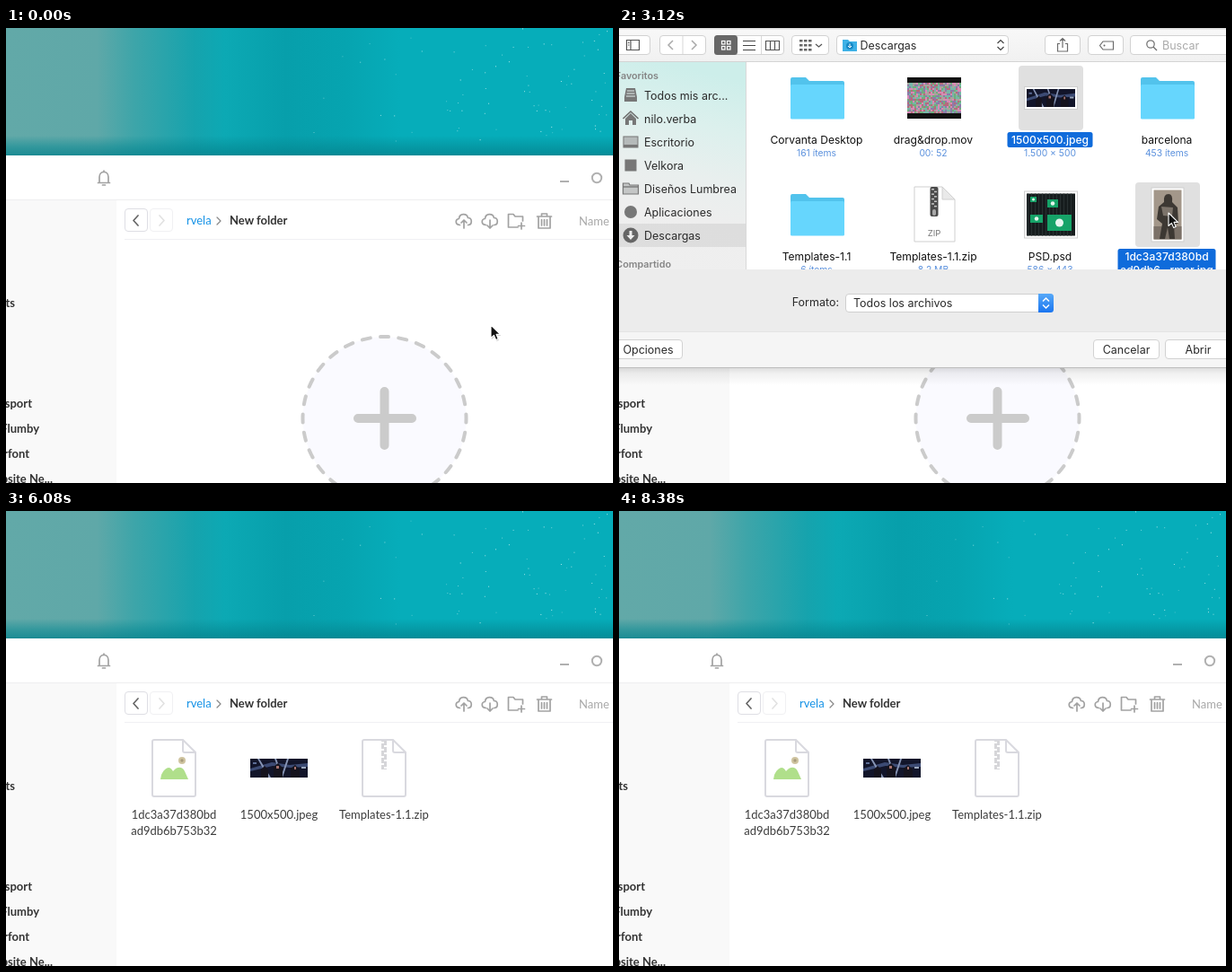
Animation, 676 px wide and 507 px high, one loop 8.4 s. Source, as an HTML page:

```html
<!DOCTYPE html>
<html lang="es">
<head>
<meta charset="utf-8">
<title>File upload</title>
<style>
html, body { margin: 0; width: 100%; height: 100%; overflow: hidden; background: #fff; }
svg { display: block; width: 676px; height: 507px; }
.app text { font: 13px Lato, sans-serif; fill: #3c3c3c; }
.app .b { font-weight: 700; fill: #333; }
.panel text { font: 12.5px Inter, sans-serif; fill: #2b2b2b; }
.panel .name { font-size: 12.1px; fill: #111; }
.panel .info { font-size: 10.3px; fill: #5b91dd; }
.panel .head { font-size: 10.8px; font-weight: 600; fill: #858585; }
.panel .picked { font-size: 12.1px; font-weight: 500; fill: #fff; }
.mid { text-anchor: middle; }
.end { text-anchor: end; }
.line { fill: none; stroke: #a2a2a2; stroke-width: 1.7; stroke-linecap: round; stroke-linejoin: round; }
.thin { fill: none; stroke: #6c6c6c; stroke-width: 1.2; }
</style>
</head>
<body>
<svg id="stage" viewBox="0 0 676 507" xmlns="http://www.w3.org/2000/svg"></svg>
<script>
const LOOP = 8400;
const stage = document.getElementById('stage');

let seed = 7;
const rnd = () => (seed = seed * 16807 % 2147483647) / 2147483647;
const times = (n, fn) => Array.from({ length: n }, (_, i) => fn(i)).join('');

const rect = (x, y, w, h, fill, extra = '') =>
  `<rect x="${x}" y="${y}" width="${w}" height="${h}" fill="${fill}" ${extra}/>`;
const path = (d, cls = 'line', extra = '') => `<path d="${d}" class="${cls}" ${extra}/>`;
const shape = (d, fill, extra = '') => `<path d="${d}" fill="${fill}" ${extra}/>`;
const disc = (x, y, r, fill, extra = '') => `<circle cx="${x}" cy="${y}" r="${r}" fill="${fill}" ${extra}/>`;
const text = (x, y, s, cls = '', extra = '') => `<text x="${x}" y="${y}" class="${cls}" ${extra}>${s}</text>`;
const at = (x, y, s) => `<g transform="translate(${x} ${y})">${s}</g>`;
const button = (x, y, w, h, border = '#d2d2d2', r = 3.5) =>
  rect(x + .5, y + .5, w - 1, h - 1, '#fff', `rx="${r}" stroke="${border}"`);
const gradient = (id, dir, stops) => `<linearGradient id="${id}" ${dir}>` +
  stops.map(([o, c, a = 1]) => `<stop offset="${o}" stop-color="${c}" stop-opacity="${a}"/>`).join('') +
  '</linearGradient>';

const down = 'x1="0" y1="0" x2="0" y2="1"';
const defs = `<defs>
  ${gradient('sea', '', [[0, '#62a9a8'], [.15, '#5fa8a8'], [.21, '#3ea5a9'], [.31, '#16a3ad'],
    [.36, '#0ca9b4'], [.46, '#079fab'], [.56, '#06a4b0'], [.65, '#06adba'], [1, '#06adba']])}
  ${gradient('surf', down, [[0, '#058791', 0], [.55, '#058791', .5], [1, '#04808b', .75]])}
  ${gradient('bar', down, [[0, '#f8f8f8'], [1, '#f1f1f1']])}
  ${gradient('tint', 'x1="0.35" y1="0" x2="0.2" y2="1"',
    [[0, '#cdeeea'], [.25, '#dcf0ed'], [.5, '#e9efee'], [.7, '#eeeeee'], [1, '#efefef']])}
  ${gradient('shade', down, [[0, '#000', .13], [.3, '#000', .06], [1, '#000', 0]])}
  ${gradient('blue', down, [[0, '#57a9f8'], [1, '#1a75f0']])}
  <clipPath id="list"><rect x="0" y="38" width="676" height="231"/></clipPath>
</defs>`;

// ---- application window ----
const wallpaper = rect(0, 0, 676, 142, 'url(#sea)') + rect(0, 120, 676, 22, 'url(#surf)') +
  times(75, () => {
    const x = 340 + 336 * Math.sqrt(rnd());
    return rect(x.toFixed(1), (rnd() * 126).toFixed(1), 1, 1, '#bff0f0', `opacity="${(.35 + rnd() * .6).toFixed(2)}"`);
  });

const cloud = 'M-4.5 4.5C-10 4.500-10-2-5.500-2.500C-5-8.500 3-9 4.500-3.500C9.500-3.500 9.500 4.500 4.500 4.500';
const cloudUp = path(cloud) + path('M0 8V-1M-3 2L0-1L3 2');
const cloudDown = path(cloud) + path('M0-1V8M-3 5L0 8L3 5');
const folderPlus = path('M2 7H-8.500V-7.500H-3L-1-5H7.500V0M6 2V9M2.500 5.500H9.500');
const trash = path('M-6.500-4.500V8H6.500V-4.500M-8-5H8M-3-5V-8H3V-5M-3-1.500V5M0-1.500V5M3-1.500V5');

const photoStrip = (x, y, w, h) => `<svg x="${x}" y="${y}" width="${w}" height="${h}" viewBox="0 0 64 21" preserveAspectRatio="none">
  ${rect(0, 0, 64, 21, '#12152a')}
  ${shape('M0 11L24 4L44 7L64 5V9L44 10L25 8L0 14Z', '#3c4b74')}
  ${shape('M8 0H10L23 21H20ZM41 0H43L36 21H34ZM27 0H29L32 8H30Z', '#8795b5')}
  ${shape('M12 21V12L16 8L20 12V21ZM26 21V9L31 5L36 10V21ZM45 21V11L50 7L55 12V21Z', '#15131d')}
  ${rect(29, 8, 3, 3, '#a5726f')}${rect(49, 9, 2, 3, '#a5726f')}${rect(57, 9, 5, 2, '#9aa7bd')}${rect(3, 4, 4, 2, '#5c6d95')}</svg>`;

const page = 'M1 3Q1 1 3 1H35L49 15V62Q49 64 47 64H3Q1 64 1 62ZM35 1V13Q35 15 37 15H49';
const sheet = path(page, '', 'fill="#fff" stroke="#d9d9df" stroke-width="2"');
const uploaded = `<g id="files">
  ${at(162, 254, sheet +
    shape('M10 45L11 40C14 33 20 28 24 36C28 31 34 30 37 36L41 45Z', '#b0df8b') +
    disc(34, 24, 4, '#cfc4a0') + disc(34, 24, 1.7, '#a79c7c'))}
  ${photoStrip(272, 276, 64, 21)}
  ${at(396, 254, sheet + rect(22, 2, 6, 32, '#d6d6d9') +
    times(8, i => rect(22 + i % 2 * 3, 3 + i * 4, 3, 2, '#fff')))}
  ${text(187, 343, '1dc3a37d380bd', 'mid')}${text(187, 361, 'ad9db6b753b32', 'mid')}
  ${text(304, 343, '1500x500.jpeg', 'mid')}${text(421, 343, 'Templates-1.1.zip', 'mid')}</g>`;

// 28 dashes of 20 units, one centred on each quarter
const dropZone = `<g id="drop">
  ${disc(421.500, 435, 91, '#fafaff', `stroke="#cbcbcb" stroke-width="4" stroke-linecap="round"
    pathLength="560" stroke-dasharray="9 11" stroke-dashoffset="4.5"`)}
  ${path('M392 435H452M421.500 405V465', '', 'stroke="#cbcbcb" stroke-width="10" stroke-linecap="round"')}</g>`;

const sideNames = [[10, 311, 'Projects'], [29, 423, 'Transport'], [37, 451, 'Flumby'],
  [26, 479, 'Marfont'], [52, 507, 'Website Ne...']];

const app = `<g class="app">${wallpaper}
  ${rect(0, 142, 676, 365, '#fff')}${rect(0, 192, 123, 315, '#f9f9f9')}
  ${rect(0, 191, 676, 1, '#eeeef0')}${rect(132, 235, 544, 1, '#f0f0f3')}
  ${path('M102.500 172.500H115.500M104 172V166C104 158.500 114 158.500 114 166V172M107.500 175H110.500M109 159V160')}
  ${rect(617, 170, 10, 2, '#b0b0b0')}
  ${disc(658, 167, 5.2, 'none', 'stroke="#b0b0b0" stroke-width="2"')}
  ${button(132, 201, 26, 26, '#dedee4')}${button(160, 201, 26, 26, '#f0f0f3')}
  ${path('M147 209L142 214.500L147 220', 'line', 'style="stroke:#666"')}
  ${path('M171 209L176 214.500L171 220', 'line', 'style="stroke:#e2e2e2"')}
  ${text(201, 219, 'rvela', '', 'style="fill:#1592e6"')}
  ${path('M235 211L239 215L235 219', 'line', 'style="stroke:#888;stroke-width:1.2"')}
  ${text(249, 219, 'New folder', 'b')}
  <g id="hover">${rect(495, 202, 28, 26, '#f2f2f2', 'rx="2"')}</g>
  ${at(510, 215, cloudUp)}${at(539, 215, cloudDown)}${at(568, 215, folderPlus)}${at(599.500, 215, trash)}
  ${text(638, 220, 'Name', '', 'style="fill:#a8a8a8"')}
  ${sideNames.map(([x, y, s]) => text(x, y, s, 'b end')).join('')}
  ${dropZone}${uploaded}</g>`;

// ---- file dialog ----
const folder = shape('M-30-21Q-30-23-28-23H-13L-9-19H28Q30-19 30-17V21Q30 23 28 23H-28Q-30 23-30 21Z', '#52c3ec') +
  rect(-30, -15, 60, 38.500, '#66d6fd', 'rx="1.500"');
const hues = ['#d88ab4', '#6fae7c', '#a9a39c', '#b66a7c', '#77b6a7', '#8c7ba8'];
const movie = rect(-30, -23, 60, 46, '#111') +
  times(30 * 17, i => rect(-30 + i % 30 * 2, -17 + Math.floor(i / 30) * 2, 2, 2, hues[Math.floor(rnd() * 6)]));
const frame = (w, h) => rect(-w / 2, -h / 2, w, h, '#fff', 'stroke="#cfcfcf" stroke-width="1"');
const banner = frame(59, 25) + photoStrip(-27, -10, 54, 20);
const zip = shape('M-22-31H9L23-17V30H-22Z', '#fff', 'stroke="#cfcfcf"') +
  shape('M9-31L23-17H9Z', '#e9e9e9', 'stroke="#d0d0d0"') +
  rect(-4.500, -31, 9, 33, '#4a4a4a', 'rx="2"') +
  times(8, i => rect(-3 + i % 2 * 3, -29 + i * 2.700, 3, 1.500, '#c5c5c5')) +
  rect(-2, -6, 4, 7, '#a9a9a9', 'rx="2"') +
  text(0, 24, 'ZIP', 'mid', 'style="font-size:9.500px;fill:#777"');
const card = (x, y, w, h) => rect(x, y, w, h, '#16a368') + disc(x + w / 2, y + h / 2, h / 4, '#e6f5ee');
const design = frame(59, 52) + rect(-27, -23.500, 54, 47, '#161c1d') +
  times(13, i => rect(-26 + i * 4, -23.500, 1, 47, '#283031')) +
  card(-23, -20, 7, 6) + card(-4, -17, 12, 9) + card(-23, 0, 14, 9) + card(-4, 0, 27, 18);
const portrait = frame(36, 60) + rect(-15.500, -27.500, 31, 55, '#a3978a') +
  rect(-15.500, 13, 31, 14.500, '#7b7168') +
  shape('M-4-14Q-5-23 1-23Q6-23 5-14L11-8L12 9L7 12L8 27H2L0 14L-3 27H-9L-6 10L-12 5L-10-9Z', '#3d3833') +
  shape('M-7-9L6-8L5 2L-5 1Z', '#7d746b');

const files = [
  [220, 0, folder, 'Corvanta Desktop', '161 ítems'],
  [350, 0, movie, 'drag&amp;drop.mov', '00: 52'],
  [480, 0, banner, '1500x500.jpeg', '1.500 × 500', 'pickA', 95],
  [610, 0, folder, 'barcelona', '453 ítems'],
  [220, 130, folder, 'Templates-1.1', '6 ítems'],
  [350, 130, zip, 'Templates-1.1.zip', '8,2 MB', 'pickC', 105],
  [480, 130, design, 'PSD.psd', '586 × 443'],
  [610, 130, portrait, '1dc3a37d380bd', 'ad9db6...rmer.jpg', 'pickB', 109]
];
const fileItem = ([x, y, icon, name, info, id, w]) => {
  const two = id === 'pickB';
  const lines = cls => text(x, y + 129, name, 'mid ' + cls) +
    (two ? text(x, y + 144, info, 'mid ' + cls) : '');
  return (id ? `<g class="${id}">${rect(x - 35, y + 42, 72, 72, '#e0e0e0', 'rx="4"')}</g>` : '') +
    at(x + 1, y + 78, icon) + lines('name') +
    (two ? '' : text(x, y + 143, info, 'mid info')) +
    (id ? `<g class="${id}">${rect(x - w / 2, y + 116, w, two ? 34 : 17, '#0f6bdb', 'rx="2.500"')}${lines('picked')}</g>` : '');
};

const places = [
  ['Todos mis arc...', shape('M-7 2L-5-8H5L7 2V7H-7Z', '#777') + path('M-4-5H4M-4.500-2H4.500M-5 1H5', '', 'stroke="#e4f0ee" stroke-width="1.200"')],
  ['nilo.verba', shape('M-6 0L0-6L6 0V7H2V2H-2V7H-6Z', '#777') + path('M-8.500 0L0-8L8.500 0', 'thin', 'style="stroke-width:1.600"')],
  ['Escritorio', rect(-8, -6, 16, 12, '#b5baba', 'stroke="#777"') + rect(-8, 3, 16, 3, '#777')],
  ['Velkora', rect(-6.500, -6.500, 13, 13, '#777')],
  ['Diseños Lumbrea', shape('M-8.500 6V-6H-2L-1-4H8.500V6Z', '#c4c6c6', 'stroke="#777" stroke-width="1.200"') + path('M-8-2H8', 'thin')],
  ['Aplicaciones', disc(0, 0, 7, '#777')],
  ['Descargas', disc(0, 0, 8.500, '#666') + shape('M-1.500-5H1.500V0H4.500L0 5L-4.500 0H-1.500Z', '#eee')]
];
const sidebar = rect(0, 38, 141, 231, 'url(#tint)') + rect(0, 218, 141, 26, '#000', 'opacity=".07"') +
  rect(141, 38, 1, 231, '#d9d9d9') +
  text(44, 57, 'Favoritos', 'head end') + text(58, 267, 'Compartido', 'head end') +
  places.map(([name, icon], i) => at(13, 75 + i * 26, icon) + text(28, 80 + i * 26, name)).join('');

const upDown = 'M-3.500-2L0-5.500L3.500-2M-3.500 2L0 5.500L3.500 2';
const toolbar = rect(0, 0, 676, 37, 'url(#bar)') + rect(0, 0, 676, 1.500, '#d9d9d9') + rect(0, 37, 676, 1, '#d4d4d4') +
  button(-8, 8, 43, 22) + path('M8.500 13.500H22.500V24.500H8.500ZM13 13.500V24.500M10 16.500H11.500M10 19H11.500', 'thin', 'style="stroke:#555"') +
  button(45, 8, 52, 22) + rect(70.500, 9, 1, 20, '#d8d8d8') +
  path('M60 14L55 19L60 24M81 14L86 19L81 24', 'thin', 'style="stroke:#aaa;stroke-width:1.500"') +
  button(106, 8, 78, 22) + rect(106, 8, 26, 22, '#676767', 'rx="3.500"') + rect(158, 9, 1, 20, '#d8d8d8') +
  times(4, i => rect(114.500 + i % 2 * 6, 14.500 + (i >> 1) * 6, 3.500, 3.500, 'none', 'stroke="#fff" stroke-width="1.200"')) +
  path('M138 14.500H152M138 19.500H152M138 24.500H152', 'thin', 'style="stroke:#444"') +
  path('M163.500 14.500H178.500V24.500H163.500ZM168.500 14.500V24.500M173.500 14.500V24.500', 'thin', 'style="stroke:#555"') +
  button(192, 8, 42, 22) +
  times(9, i => rect(201 + i % 3 * 5, 13 + Math.floor(i / 3) * 5, 3.500, 2.500, '#666')) +
  path('M219 18L222.500 21L226 18', 'thin', 'style="stroke:#555"') +
  button(242, 8, 192, 22) + shape('M249 13H255L257 15H265V26H249Z', '#3eb1e6') +
  disc(257, 20, 4, '#1689c6') + path('M257 17.500V22M255 20L257 22L259 20', '', 'fill="none" stroke="#fff"') +
  text(268.500, 24, 'Descargas') + at(425, 19, path(upDown, 'thin', 'style="stroke:#444"')) +
  button(474, 8, 40, 22) + button(522, 8, 40, 22) +
  `<g id="tools">${path('M491 17.500H488.500V26H499.500V17.500H497M494 22V11.500M491 14.500L494 11.500L497 14.500', 'thin')}
  ${path('M535.500 19.500L539 15H550.500V24H539Z', 'thin')}${disc(540.500, 19.500, 1, '#666')}</g>` +
  button(569, 8, 120, 22) + disc(592, 18, 4.200, 'none', 'stroke="#777" stroke-width="1.300"') +
  path('M595 21L599 25', 'thin') + text(605, 24, 'Buscar', '', 'style="fill:#aaa"');

const footer = rect(0, 269, 676, 69, '#ececec') + rect(0, 338, 676, 40, '#f5f5f5') +
  rect(0, 338, 676, 1, '#e4e4e4') + rect(0, 378, 676, 1, '#bdbdbd') +
  text(245, 310, 'Formato:', 'end') + button(252, 296, 232, 21, '#cfcfcf') +
  shape('M467 296H480.500Q484 296 484 299.500V313.500Q484 317 480.500 317H467Z', 'url(#blue)') +
  at(475.500, 306.500, path(upDown, 'thin', 'style="stroke:#fff;stroke-width:1.500"')) +
  text(261, 311, 'Todos los archivos') +
  button(-14, 347, 85, 22) + text(32.500, 363, 'Opciones', 'mid') +
  button(528, 347, 74, 22) + text(565, 363, 'Cancelar', 'mid') +
  button(608, 347, 84, 22) + `<g id="open">${text(645, 363, 'Abrir', 'mid')}</g>`;

const panel = `<g id="panel" class="panel">${rect(0, 379, 676, 19, 'url(#shade)')}
  ${rect(0, 0, 676, 378, '#fff')}
  <g clip-path="url(#list)">${sidebar}${files.map(fileItem).join('')}</g>${toolbar}${footer}</g>`;

const arrow = 'M0 0V14.500L3.400 11.400L5.700 16.600L8.200 15.500L6 10.400H10.500Z';
const pointer = `<g id="pointer">${shape(arrow, '#000', 'opacity=".18" transform="translate(.8 1.500)"')}
  ${shape(arrow, '#111', 'stroke="#fff" stroke-width="1.100" stroke-linejoin="round"')}</g>`;

stage.innerHTML = defs + app + panel + pointer;

// ---- timeline ----
const moves = [[0, 540, 331], [120, 540, 331], [640, 504, 219], [1980, 504, 219], [2360, 487, 84], [2560, 487, 84],
  [2980, 612, 206], [3240, 612, 206], [3740, 362, 214], [4080, 362, 214], [4280, 391, 221],
  [4820, 620, 354], [5480, 620, 354], [6050, 690, 440], [LOOP, 690, 440]];
const fades = [[0, 0], [1240, 0], [1360, 1], [5080, 1], [5220, 0], [LOOP, 0]];
const picks = { pickA: 2460, pickB: 3120, pickC: 3900 };
const FILES_AT = 5900;

const ease = p => p * p * (3 - 2 * p);
function tween(keys, t) {
  const i = keys.findIndex(k => k[0] > t);
  const a = keys[i - 1], b = keys[i];
  const p = ease((t - a[0]) / (b[0] - a[0]));
  return a.slice(1).map((v, n) => v + (b[n + 1] - v) * p);
}
const el = id => document.getElementById(id);
const show = (node, on) => { node.style.display = on ? '' : 'none'; };

function render(t) {
  const [x, y] = tween(moves, t);
  const [fade] = tween(fades, t);
  el('pointer').setAttribute('transform', `translate(${x.toFixed(1)} ${y.toFixed(1)})`);
  el('panel').style.opacity = fade;
  show(el('panel'), fade > 0);
  show(el('hover'), x > 495 && x < 523 && y > 202 && y < 228);
  for (const id in picks) stage.querySelectorAll('.' + id).forEach(n => show(n, t >= picks[id]));
  const active = t >= picks.pickA;
  el('open').style.opacity = active ? 1 : .4;
  el('tools').style.opacity = active ? 1 : .45;
  show(el('drop'), t < FILES_AT);
  show(el('files'), t >= FILES_AT);
}

const start = performance.now();
function tick(now) {
  render(Math.max(0, now - start) % LOOP);
  requestAnimationFrame(tick);
}
render(0);
requestAnimationFrame(tick);
</script>
</body>
</html>
```
